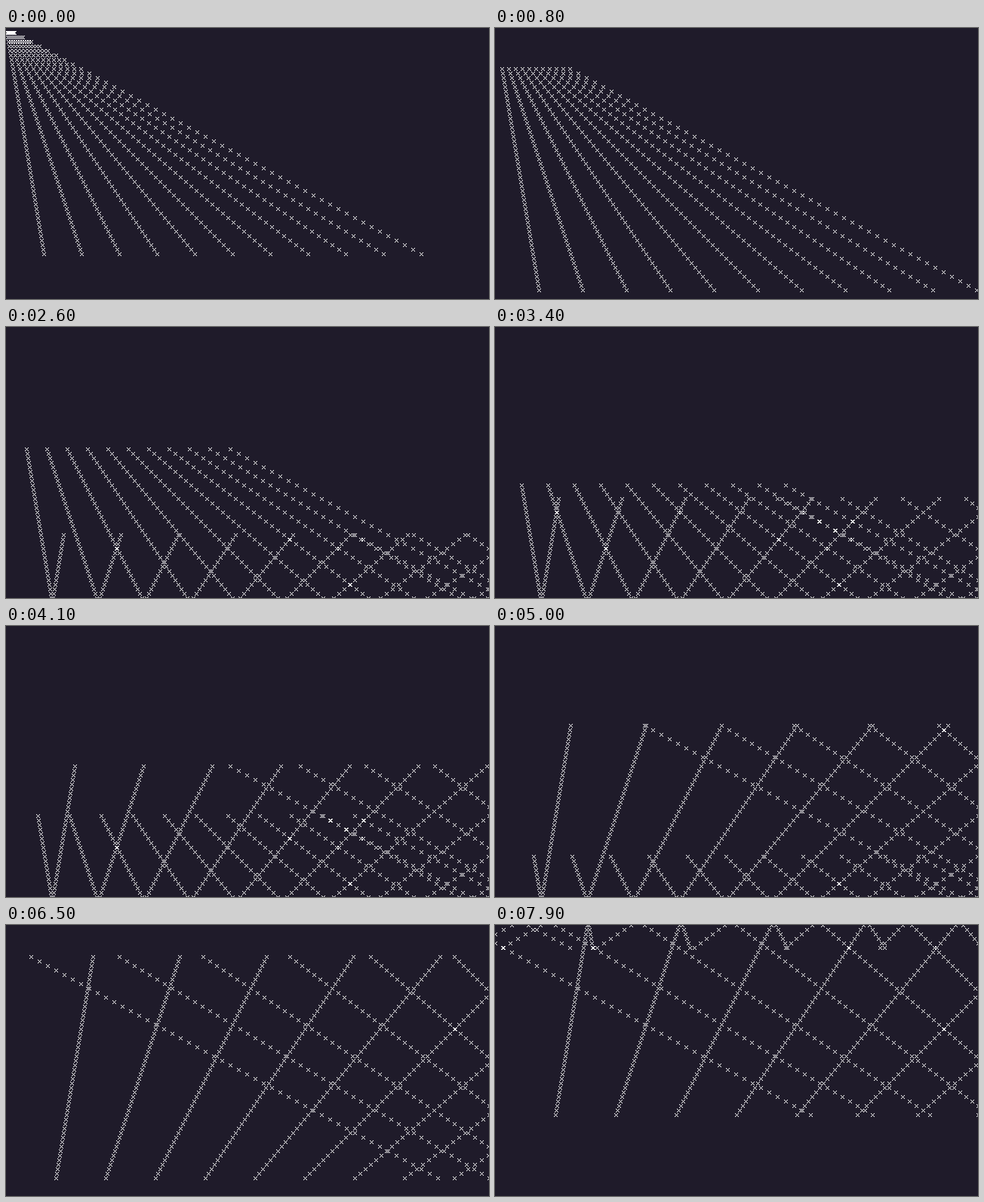
Animation, 640 px wide and 360 px high, one loop 8000 ms. Source, as an HTML page with a canvas:

```html
<!DOCTYPE html>
<html lang="en">
<head>
<meta charset="utf-8">
<title>Bouncing crosses</title>
<style>
  html, body { margin: 0; width: 100%; height: 100%; overflow: hidden; background: #1f1b2a; }
  canvas { display: block; }
</style>
</head>
<body>
<canvas id="stage" width="640" height="360"></canvas>
<script>
const W = 640, H = 360, LINES = 11, TRAIL = 50;
const STEP_MS = 100, LOOP_MS = 8000, RISE = 6;
const ctx = document.getElementById('stage').getContext('2d');

// Position after i steps; the direction flips one step past either edge.
function bounce(i, step, size) {
  const span = Math.floor(size / step) + 2;
  const p = (i + 1) % (2 * span);
  return step * (Math.min(p, 2 * span - p) - 1);
}

function cross(x, y) {
  for (let d = -2; d <= 2; d++) {
    ctx.fillRect(x + d, y + d, 1, 1);
    ctx.fillRect(x + d, y - d, 1, 1);
  }
}

function draw(now) {
  const tick = Math.floor((now % LOOP_MS) / STEP_MS);
  ctx.fillStyle = '#1f1b2a';
  ctx.fillRect(0, 0, W, H);
  ctx.fillStyle = '#fff';
  for (let i = tick + 1; i <= tick + TRAIL; i++) {
    const y = bounce(i, RISE, H);
    for (let k = 1; k <= LINES; k++) cross(bounce(i, k, W), y);
  }
}

const start = performance.now();
function loop() {
  draw(performance.now() - start);
  requestAnimationFrame(loop);
}
loop();
</script>
</body>
</html>
```
